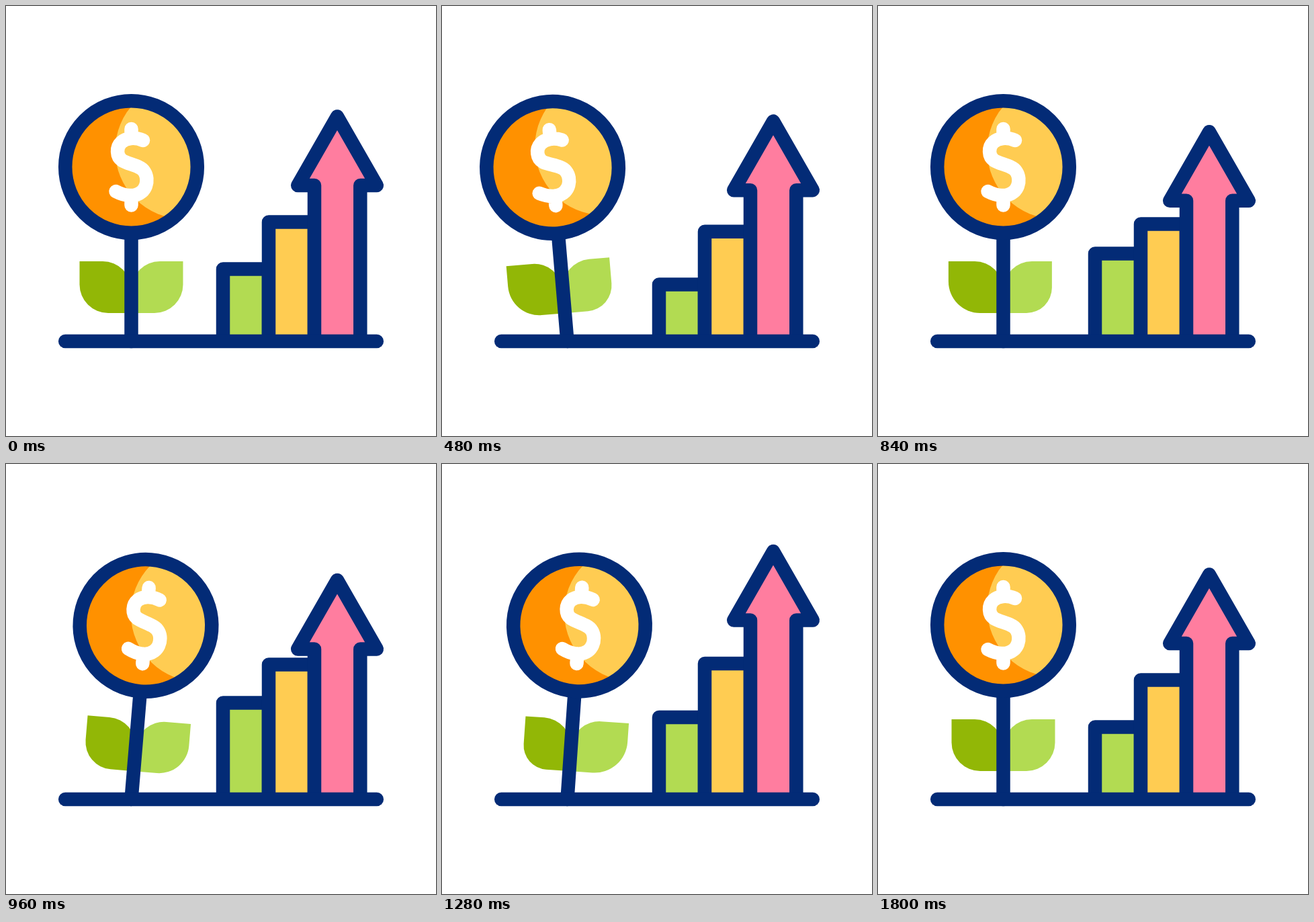
An HTML page with a canvas that plays this animation: 640x640 px, repeating every 2040 ms.

```html
<!DOCTYPE html>
<html lang="en">
<head>
<meta charset="utf-8">
<title>Growth</title>
<style>
  html, body { margin: 0; width: 100%; height: 100%; overflow: hidden; background: #fff; }
  canvas { display: block; width: 100vmin; height: 100vmin; }
</style>
</head>
<body>
<canvas id="stage" width="640" height="640"></canvas>
<script>
const ctx = document.getElementById('stage').getContext('2d');
const LOOP = 2040, STEP = 40;
const LINE = 20.5, GROUND = 499, FOOT = GROUND - 3, STEM = 186.5;
const NAVY = '#032b76', ORANGE = '#ff9100', YELLOW = '#ffcc52',
      LIME = '#b2db52', GREEN = '#92b706', PINK = '#ff7d9f';

// Eased progress from 0 to 1.
function ease(t, start, length) {
  const p = Math.min(1, Math.max(0, (t - start) / length));
  return p * p * (3 - 2 * p);
}

// Every part shares one rhythm: out to a, across to b, back to rest.
function swing(t, start, pace, a, b) {
  const u = (t - start) / pace;
  return a * ease(u, 0, 500) + (b - a) * ease(u, 520, 400) - b * ease(u, 980, 460);
}

function fill(path, color) {
  ctx.fillStyle = color;
  ctx.fill(path);
}

function stroke(path, color = NAVY) {
  ctx.strokeStyle = color;
  ctx.stroke(path);
}

function disc(x, y, r) {
  const path = new Path2D();
  path.arc(x, y, r, 0, Math.PI * 2);
  return path;
}

const coin = disc(STEM, 239.5, 98.3);
const shine = disc(264.5, 215, 102);
const stem = new Path2D(`M${STEM} 340V${GROUND}`);
const dollar = new Path2D(
  'M204 200C192 195 179 196 171.5 203C164 210 164 224 173 230' +
  'C180 234 190 236 198 240C212 246 213 267 202 276.5C192 285 177 283 163.5 276' +
  'M186.5 183V196M186.5 282V296.5');
const ground = new Path2D(`M88.2 ${GROUND}H551.8`);

// A leaf that reaches further also gets a rounder lower corner.
function drawLeaf(side, stretch, color) {
  const top = 380, bottom = 457, r = 42.5;
  const w = 77 + stretch, round = r + stretch;
  ctx.save();
  ctx.translate(STEM, 0);
  ctx.scale(side, 1);
  fill(new Path2D(
    `M${w} ${top}H${r}A${r} ${r} 0 0 0 0 ${top + r}V${bottom}H${w - round}` +
    `A${round} ${round} 0 0 0 ${w} ${bottom - round}Z`), color);
  ctx.restore();
}

function drawFlower(angle, lean) {
  ctx.save();
  ctx.translate(STEM, GROUND);
  ctx.rotate(angle * Math.PI / 180);
  ctx.translate(-STEM, -GROUND);
  drawLeaf(-1, -lean, GREEN);
  drawLeaf(1, lean, LIME);
  stroke(stem);
  fill(coin, ORANGE);
  ctx.save();
  ctx.clip(coin);
  fill(shine, YELLOW);
  ctx.restore();
  stroke(coin);
  stroke(dollar, '#fff');
  ctx.restore();
}

function drawBar(left, right, top, color) {
  const path = new Path2D(`M${left} ${FOOT}V${top}H${right}V${FOOT}`);
  fill(path, color);
  stroke(path);
}

function drawArrow(shift) {
  const base = 267 + shift, tip = 164.5 + shift;
  const path = new Path2D(
    `M459 ${FOOT}V${base}H434.2L493 ${tip}L551.8 ${base}H527.3V${FOOT}`);
  fill(path, PINK);
  stroke(path);
}

function draw(t) {
  ctx.fillStyle = '#fff';
  ctx.fillRect(0, 0, 640, 640);
  ctx.lineWidth = LINE;
  ctx.lineCap = ctx.lineJoin = 'round';
  drawFlower(swing(t, 120, 1, -6, 6), swing(t, 220, 0.98, -7.5, 7.5));
  drawBar(323, 391, 391.5 + swing(t, 40, 1, 24, -36), LIME);
  drawBar(391, 459, 321.5 + swing(t, 200, 0.945, 22.5, -34.5), YELLOW);
  drawArrow(swing(t, 289, 1.03, 23, -34.5));
  stroke(ground);
}

const start = performance.now();
function tick() {
  const t = (performance.now() - start) % LOOP;
  draw(Math.floor(t / STEP) * STEP);
  requestAnimationFrame(tick);
}
tick();
</script>
</body>
</html>
```
